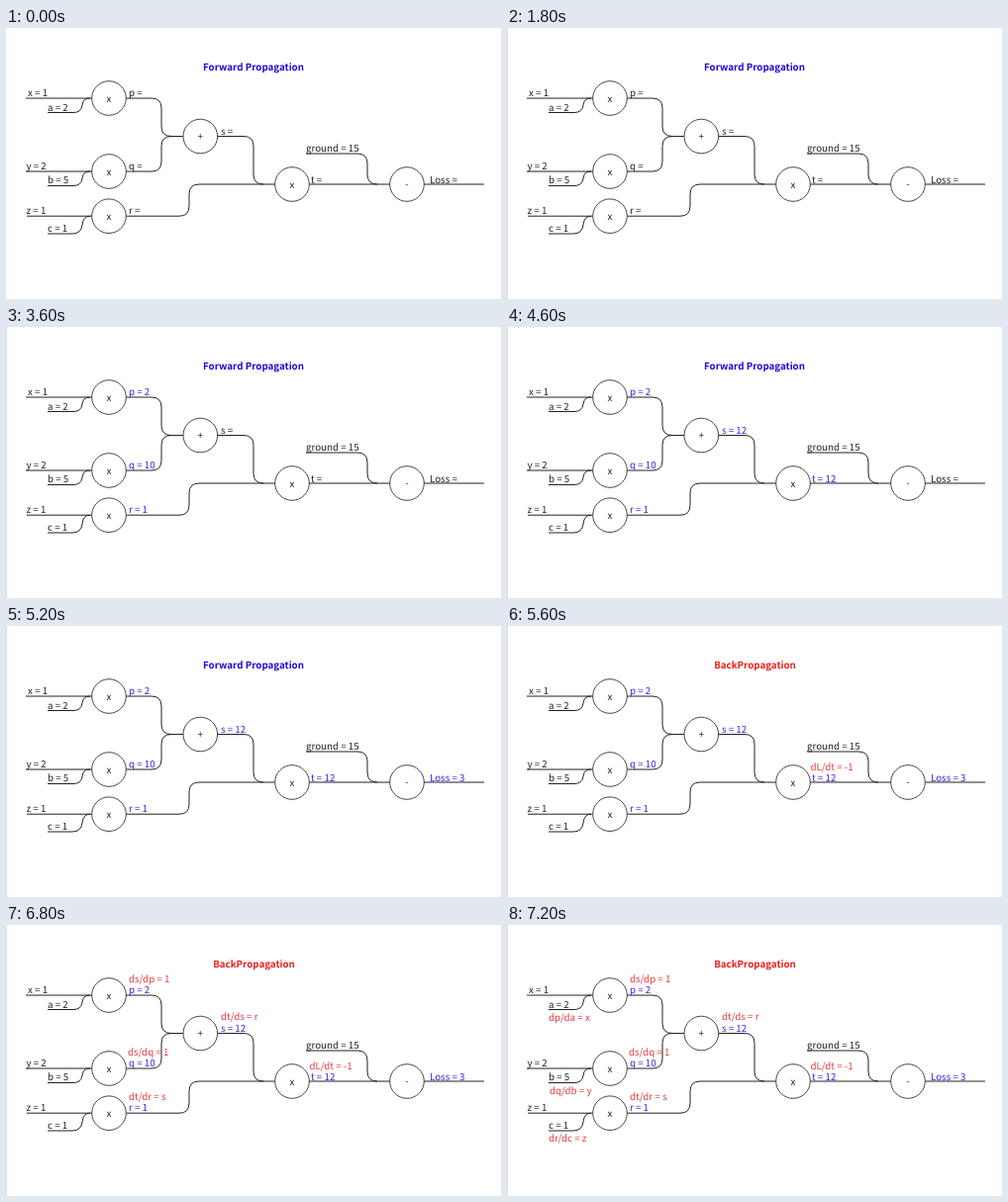
Recreate the animation shown at these times as an HTML page. Size 500 px wide and 274 px high, loop 8000 ms.

```html
<!DOCTYPE html>
<html lang="en">
<head>
<meta charset="utf-8">
<title>Forward and back propagation</title>
<style>
  html, body { margin: 0; width: 100%; height: 100%; overflow: hidden; background: #fff; }
  svg { display: block; width: 500px; height: 274px; }
  text {
    font: 9.75px "Noto Sans CJK SC", "Noto Sans CJK JP", "Noto Sans CJK", "Open Sans", sans-serif;
    fill: #222;
    text-rendering: geometricPrecision;
  }
  .wires { fill: none; stroke: #222; stroke-width: 1; }
  .nodes circle { fill: #fff; stroke: #333; stroke-width: .9; }
  .nodes text, .title { text-anchor: middle; }
  .title { font-weight: 700; }

  /* Each timed part switches its fill from --off to --on at its step. */
  .value { --off: #222; --on: #3f22dc; }
  .value tspan { --off: transparent; }
  .grad { --off: transparent; --on: #e23c3c; }
  .forward { --off: #2404dc; --on: transparent; }
  .back { --off: transparent; --on: #f01c1c; }
  .edge { --off: transparent; --on: #dedede; }
  .step, .value tspan { animation: 8s step-end infinite; }
  .edge { animation-name: edge; }
  .p, .p tspan { animation-name: p; }
  .q, .q tspan { animation-name: q; }
  .r, .r tspan { animation-name: r; }
  .s, .s tspan { animation-name: s; }
  .t, .t tspan { animation-name: t; }
  .loss, .loss tspan { animation-name: loss; }
  .b1 { animation-name: b1; }
  .b2 { animation-name: b2; }
  .b3 { animation-name: b3; }
  .b4 { animation-name: b4; }

  @keyframes edge { 0% { fill: var(--off); } 22.5%, 100% { fill: var(--on); } }
  @keyframes p { 0% { fill: var(--off); } 27.5%, 100% { fill: var(--on); } }
  @keyframes q { 0% { fill: var(--off); } 37.5%, 100% { fill: var(--on); } }
  @keyframes r { 0% { fill: var(--off); } 45%, 100% { fill: var(--on); } }
  @keyframes s { 0% { fill: var(--off); } 52.5%, 100% { fill: var(--on); } }
  @keyframes t { 0% { fill: var(--off); } 57.5%, 100% { fill: var(--on); } }
  @keyframes loss { 0% { fill: var(--off); } 65%, 100% { fill: var(--on); } }
  @keyframes b1 { 0% { fill: var(--off); } 70%, 100% { fill: var(--on); } }
  @keyframes b2 { 0% { fill: var(--off); } 77.5%, 100% { fill: var(--on); } }
  @keyframes b3 { 0% { fill: var(--off); } 85%, 100% { fill: var(--on); } }
  @keyframes b4 { 0% { fill: var(--off); } 90%, 100% { fill: var(--on); } }
</style>
</head>
<body>
<svg viewBox="0 0 500 274">
  <rect class="step edge" width="1" height="274"/>

  <g class="wires">
    <path d="M20 71H87M42 85.5H68Q76 85.5 77 78T85 71"/>
    <path d="M20 145H87M42 159.5H68Q76 159.5 77 152T85 145"/>
    <path d="M21 190.2H87M42 208H67Q76 208 77 199T85 190.2"/>
    <path d="M121 71H147Q157 71 157 81V99.5Q157 109.5 167 109.5H179"/>
    <path d="M121 145H147Q157 145 157 135V119.5Q157 109.5 167 109.5"/>
    <path d="M213 109.5H240Q250 109.5 250 119.5V148Q250 158 260 158H272"/>
    <path d="M121 190.2H175Q185 190.2 185 180V168Q185 158 195 158H260"/>
    <path d="M306 158H388M303 127H355Q365 127 365 137V148Q365 158 375 158"/>
    <path d="M422 158H483"/>
  </g>

  <g class="nodes">
    <circle cx="104" cy="71" r="17.3"/><text x="104" y="75">x</text>
    <circle cx="104" cy="145" r="17.3"/><text x="104" y="149">x</text>
    <circle cx="104" cy="190.2" r="17.3"/><text x="104" y="194">x</text>
    <circle cx="196.3" cy="109.5" r="17.3"/><text x="196.3" y="113">+</text>
    <circle cx="289" cy="158" r="17.3"/><text x="289" y="162">x</text>
    <circle cx="405" cy="158" r="17.3"/><text x="405" y="161">-</text>
  </g>

  <text x="22" y="69">x = 1</text>
  <text x="42" y="83.5">a = 2</text>
  <text x="20.5" y="143">y = 2</text>
  <text x="42" y="157">b = 5</text>
  <text x="20.5" y="188">z = 1</text>
  <text x="42" y="206">c = 1</text>
  <text x="303" y="125">ground = 15</text>

  <text class="step value p" x="124" y="69">p =<tspan> 2</tspan></text>
  <text class="step value q" x="124" y="143">q =<tspan> 10</tspan></text>
  <text class="step value r" x="124" y="188.3">r =<tspan> 1</tspan></text>
  <text class="step value s" x="217" y="108">s =<tspan> 12</tspan></text>
  <text class="step value t" x="308" y="157">t =<tspan> 12</tspan></text>
  <text class="step value loss" x="428" y="156.5">Loss =<tspan> 3</tspan></text>

  <text class="step title forward b1" x="250" y="43">Forward Propagation</text>
  <text class="step title back b1" x="250.5" y="43">BackPropagation</text>

  <text class="step grad b1" x="306.5" y="145.5">dL/dt = -1</text>
  <text class="step grad b2" x="217" y="95.5">dt/ds = r</text>
  <text class="step grad b2" x="124" y="177">dt/dr = s</text>
  <text class="step grad b3" x="124" y="57.5">ds/dp = 1</text>
  <text class="step grad b3" x="123" y="131.5">ds/dq = 1</text>
  <text class="step grad b4" x="42" y="96.5">dp/da = x</text>
  <text class="step grad b4" x="43" y="170.5">dq/db = y</text>
  <text class="step grad b4" x="42" y="219">dr/dc = z</text>
</svg>
</body>
</html>
```
